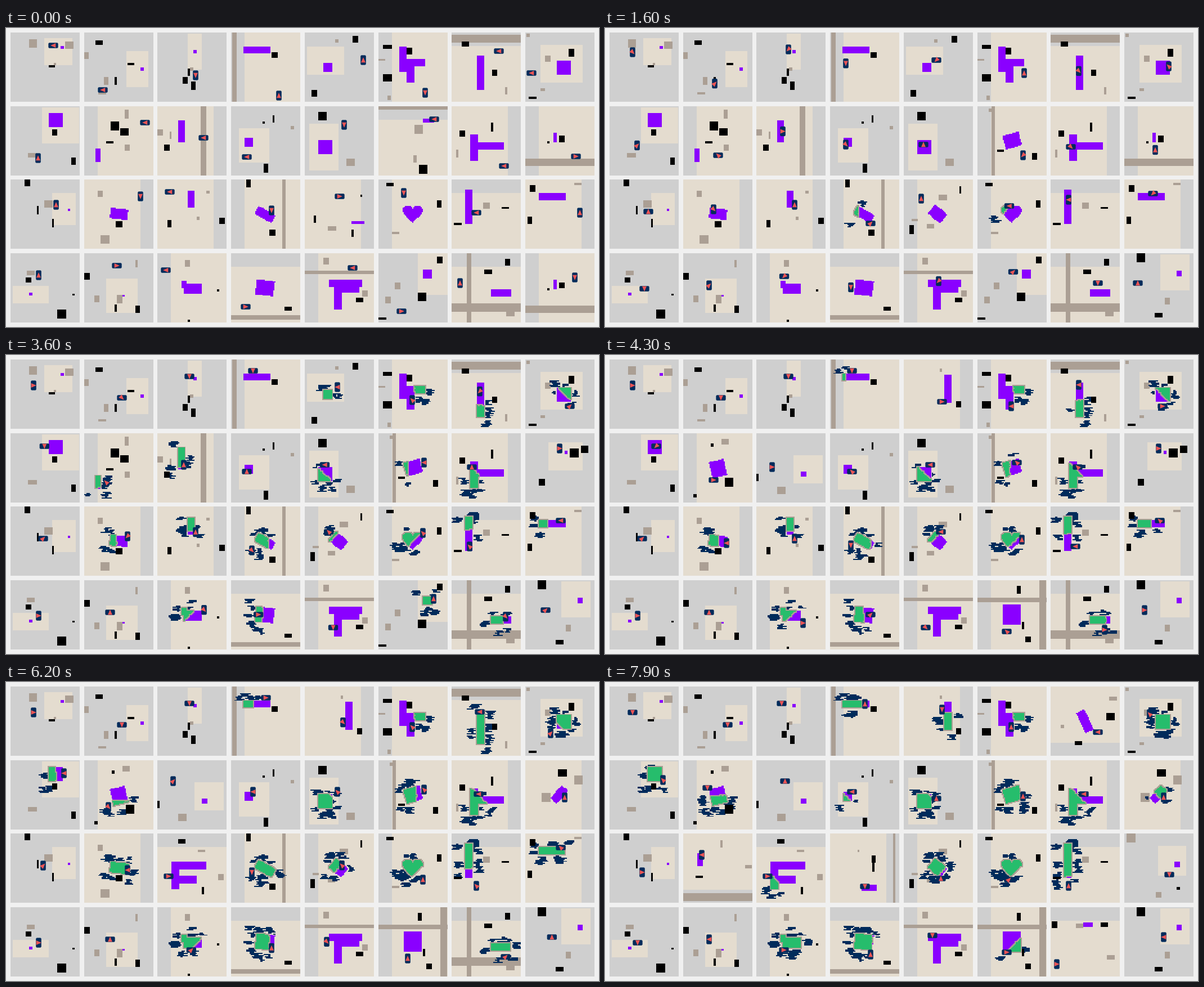
These frames come from a looping animation (1054 by 531 pixels, 8000 ms). A matplotlib script:

```python
import numpy as np
import matplotlib.pyplot as plt
from matplotlib.animation import FuncAnimation
from matplotlib.colors import to_rgb
from matplotlib.patches import FancyBboxPatch, Polygon
from matplotlib.path import Path

W, H, DPI = 1054, 531, 100
FRAMES, STEP_MS = 80, 100
CELLS, SIDE, PITCH, GAP = 64, 123, 130.78, 7.78
HOP, MARGIN = 11.5, 23
NEVER = 999
KEYS = (0, 9, 22, 50, 79)
BG, SAND, SOIL, GOAL, ROCK, NAVY, DUG = range(7)
PALETTE = np.array([to_rgb(c) for c in (
    "#cfcfcf", "#e4dccf", "#ab9f94", "#8a00ff", "#000000", "#002b5b", "#26bd6c")])
COMPASS = {name: i * 45 for i, name in enumerate("E SE S SW W NW N NE".split())}
SIZES = dict(dot=(4, 4), bit=(6, 6), post=(4, 14), tall=(8, 14), lump=(10, 11),
             block=(15, 14), flat=(13, 4), slab=(14, 8))

episodes = {}


def box(x0, y0, x1, y1):
    return np.array([(x0, y0), (x1, y0), (x1, y1), (x0, y1)])


def tilted(cx, cy, w, h, deg):
    a = np.radians(deg)
    turn = np.array([(np.cos(a), np.sin(a)), (-np.sin(a), np.cos(a))])
    return box(-w / 2, -h / 2, w / 2, h / 2) @ turn + (cx, cy)


def heart(cx, cy, size):
    t = np.linspace(0, 2 * np.pi, 60)
    y = 13 * np.cos(t) - 5 * np.cos(2 * t) - 2 * np.cos(3 * t) - np.cos(4 * t)
    return np.column_stack([16 * np.sin(t) ** 3, -y]) * size / 16 + (cx, cy)


def origin(col, row):
    return GAP + PITCH * col, GAP + PITCH * row


def field(side, ox, oy):
    """Whole tile except a margin on one side."""
    x0, y0, x1, y1 = ox, oy, ox + SIDE, oy + SIDE
    return box(x0 + MARGIN * (side == "L"), y0 + MARGIN * (side == "T"),
               x1 - MARGIN * (side == "R"), y1 - MARGIN * (side == "B"))


def road(axis, mid, width, ox, oy):
    a, b = mid - width / 2, mid + width / 2
    return box(a, oy, b, oy + SIDE) if axis == "v" else box(ox, a, ox + SIDE, b)


def item(x, y, kind):
    w, h = SIZES[kind]
    return box(x - w / 2, y - h / 2, x + w / 2, y + h / 2)


def mask(shape, X, Y):
    grid = np.column_stack([X.ravel(), Y.ravel()])
    return Path(shape).contains_points(grid).reshape(X.shape)


def grow(m, n=1):
    p = np.pad(m, n)
    span = range(2 * n + 1)
    return np.any([p[i:i + CELLS, j:j + CELLS] for i in span for j in span], axis=0)


def spill(bite, free, rng):
    """Two ragged heaps a short way off the cells just dug."""
    out = np.zeros_like(bite)
    spots = np.argwhere(grow(bite, 7) & ~grow(bite, 3) & free)
    if len(spots):
        for r, c in spots[rng.integers(len(spots), size=2)]:
            for i in range(rng.integers(3, 7)):
                left, right = rng.integers(1, 6, 2)
                out[r + i:r + i + 1, max(0, c - left):c + right] = True
    return out & free


def excavate(base, X, Y, dig, rng):
    """Frame in which each cell is dug or covered by spoil."""
    dug, dirt = np.full(X.shape, NEVER), np.full(X.shape, NEVER)
    if dig:
        sweep, first, last, share = dig
        a = np.radians(COMPASS[sweep])
        goal = base == GOAL
        free = ~grow(goal) & (base != ROCK)
        order = np.argsort((X * np.cos(a) + Y * np.sin(a))[goal])
        cells = np.argwhere(goal)[order][:int(share * goal.sum())]
        n = max(1, (last - first) // 7)
        for i, part in enumerate(np.array_split(cells, n)):
            when = first + round((i + 1) * (last - first) / n)
            bite = np.zeros(X.shape, bool)
            bite[tuple(part.T)] = True
            dug[bite] = when
            heap = spill(bite, free, rng)
            dirt[heap] = np.minimum(dirt[heap], when)
    return dug, dirt


def tile(col, row, sand, goal, rocks, soils, poses, dig=None, start=0, roads=()):
    ox, oy = origin(col, row)
    mid = (np.arange(CELLS) + 0.5) * SIDE / CELLS
    X, Y = np.meshgrid(mid + ox, mid + oy)
    ground = field(sand, ox, oy) if isinstance(sand, str) else box(*sand)
    layers = [(SAND, ground)]
    layers += [(SOIL, road(*r, ox, oy)) for r in roads]
    layers += [(SOIL, item(*s)) for s in soils]
    layers += [(GOAL, g) for g in goal] + [(ROCK, item(*r)) for r in rocks]
    base = np.full(X.shape, BG)
    for kind, shape in layers:
        base[mask(shape, X, Y)] = kind
    dug, dirt = excavate(base, X, Y, dig, np.random.default_rng(97 * col + 13 * row + start))
    keys = [k for k in KEYS if k >= start][:len(poses)]
    episodes.setdefault((col, row), []).append(
        dict(start=start, base=base, dug=dug, dirt=dirt, keys=keys, poses=poses))


def route(a, b):
    """Poses from a to b in single hops, along the current heading first."""
    (x, y, da), (bx, by, db) = a, b
    turn = (COMPASS[db[1:]] - COMPASS[da[1:]] + 180) % 360 - 180
    out = [(x, y, da[0])]
    for axis in ("hv" if da[0] == "h" else "vh"):
        gap = bx - x if axis == "h" else by - y
        n = int(round(abs(gap) / HOP))
        if n and out[-1][2] != axis:
            out.append((x, y, axis))
        for i in range(1, n + 1):
            d = gap * i / n
            out.append((x + d, y, axis) if axis == "h" else (x, y + d, axis))
        x, y = out[-1][:2]
    if out[-1] != (bx, by, db[0]) or turn:
        out.append((bx, by, db[0]))
    last = max(1, len(out) - 1)
    return [(px, py, ax, COMPASS[da[1:]] + round(turn * i / last / 45) * 45)
            for i, (px, py, ax) in enumerate(out)]


def pose_at(ep, f):
    keys, poses = ep["keys"], ep["poses"]
    for i in range(len(keys) - 1):
        if keys[i] <= f < keys[i + 1]:
            path = route(poses[i], poses[i + 1])
            return path[int((f - keys[i]) / (keys[i + 1] - keys[i]) * len(path))]
    x, y, d = poses[0] if f < keys[0] else poses[-1]
    return x, y, d[0], COMPASS[d[1:]]


# Top row
tile(0, 0, (67, 17, 117, 66), [box(96, 31, 102, 36)], [(81, 67, "flat")],
     [(47, 27, "block"), (112, 30, "block"), (86, 64, "dot")],
     [(84, 31, "hW"), (60, 43, "hS"), (49, 54, "vE"), (49, 54, "vE"), (49, 54, "hS")])
tile(1, 0, (213, 40, 252, 104), [box(238, 69, 244, 75)],
     [(164, 25, "slab"), (221, 64, "flat"), (194, 93, "post")],
     [(177, 93, "tall"), (141, 48, "lump"), (170, 115, "flat")],
     [(172, 110, "hW"), (184, 110, "hN"), (195, 76, "vE"), (206, 76, "hS"), (218, 76, "hS")])
tile(2, 0, (323, 10, 348, 73), [box(333, 38, 338, 44)],
     [(325, 78, "post"), (318, 93, "lump"), (333, 102, "tall")], [(330, 73, "bit")],
     [(337, 84, "vS"), (326, 49, "hN"), (326, 38, "hS"), (326, 38, "hS"), (314, 38, "hS")])
tile(3, 0, "L", [box(421, 33, 469, 44)], [(477, 47, "lump")], [],
     [(485, 120, "vN"), (451, 86, "hS"), (428, 28, "hS"), (439, 28, "hS"), (462, 39, "vN")],
     ("E", 34, 79, .72), roads=[("v", 406, 8)])
tile(4, 0, (535, 33, 600, 82), [box(564, 62, 579, 77)],
     [(620, 19, "lump"), (547, 116, "lump")], [(587, 23, "bit")],
     [(635, 57, "vN"), (566, 57, "hS"), (589, 57, "vW")], ("E", 14, 34, 1))
tile(4, 0, "R", [box(602, 35, 615, 84)], [(628, 87, "lump")], [(596, 26, "dot")],
     [(599, 83, "hE"), (599, 49, "vS")], ("N", 56, 79, .62), start=43)
tile(5, 0, "L", [box(698, 33, 712, 77), box(712, 54, 744, 67), box(712, 67, 725, 96)],
     [(677, 32, "slab"), (677, 88, "block"), (716, 40, "lump")],
     [(667, 56, "flat"), (680, 123, "bit")],
     [(745, 115, "vS"), (745, 57, "vNW"), (745, 80, "hN"), (722, 91, "vW"), (722, 80, "vN")],
     ("W", 14, 30, .175))
tile(6, 0, "T", [box(837, 48, 850, 109)], [(817, 28, "slab"), (869, 79, "lump")],
     [(888, 111, "post")],
     [(876, 41, "hW"), (842, 53, "vE"), (842, 88, "vS"), (842, 53, "hW"), (852, 53, "hW")],
     ("N", 15, 62, .97), roads=[("h", 18, 14)])
tile(6, 0, "B", [tilted(853, 69, 16, 40, -25)], [(898, 60, "block"), (841, 107, "slab")],
     [(903, 29, "slab"), (812, 78, "bit")], [(876, 89, "hW")], start=70)
tile(7, 0, (950, 29, 1025, 96), [box(979, 58, 1004, 83)],
     [(1005, 44, "tall"), (936, 123, "flat")],
     [(928, 12, "bit"), (962, 54, "lump"), (954, 109, "bit")],
     [(934, 80, "hW"), (1002, 80, "vW"), (1002, 68, "vN"), (991, 91, "hE"), (968, 57, "vNW")],
     ("SW", 10, 66, 1))

# Second row
tile(0, 1, (63, 140, 128, 204), [box(75, 150, 100, 175)],
     [(86, 184, "lump"), (120, 235, "tall")], [(46, 225, "slab")],
     [(57, 231, "vN"), (57, 231, "hN"), (57, 186, "vE"), (91, 162, "hSW"), (103, 174, "vNW")],
     ("E", 40, 74, 1))
tile(1, 1, "L", [box(158, 213, 167, 237)],
     [(192, 173, "block"), (209, 184, "block"), (183, 202, "flat")],
     [(214, 152, "tall"), (215, 211, "lump")],
     [(247, 168, "hW"), (247, 226, "hN"), (178, 226, "vNW")], ("S", 15, 36, .87))
tile(1, 1, "L", [tilted(200, 201, 27, 30, -15)],
     [(190, 158, "bit"), (219, 225, "block"), (158, 249, "bit")], [(213, 153, "slab")],
     [(193, 222, "hE"), (182, 188, "hS")], ("N", 43, 79, .48), start=43)
tile(2, 1, "R", [box(306, 164, 317, 202)], [(285, 211, "lump")],
     [(274, 184, "lump"), (292, 190, "post")],
     [(351, 195, "hW"), (316, 172, "hS"), (316, 195, "vN")],
     ("S", 13, 36, .88), roads=[("v", 351, 10)])
tile(2, 1, (334, 177, 386, 227), [box(348, 206, 357, 215)], [(271, 217, "post")],
     [(313, 239, "block")], [(297, 199, "vE"), (320, 176, "hN")], start=43)
tile(3, 1, (413, 177, 467, 238), [box(423, 194, 438, 209)],
     [(475, 160, "post"), (458, 167, "dot"), (462, 248, "tall")], [(508, 176, "bit")],
     [(428, 229, "hW"), (439, 207, "hS"), (428, 195, "vE"), (439, 207, "vW"), (439, 195, "hW")],
     ("NE", 72, 79, .3))
tile(4, 1, (538, 169, 590, 252), [box(554, 198, 579, 223)], [(562, 156, "block")],
     [(611, 237, "block")],
     [(601, 172, "vS"), (566, 195, "vE"), (555, 207, "vNW"), (578, 195, "hW"), (589, 207, "hN")],
     ("NE", 10, 62, .97))
tile(5, 1, "T", [box(740, 160, 760, 167)], [(740, 250, "block")],
     [(733, 179, "block"), (726, 232, "post")],
     [(761, 162, "hW"), (750, 162, "hE")], ("W", 4, 9, .3), roads=[("h", 141, 6)])
tile(5, 1, "L", [tilted(723, 199, 30, 25, -18)], [(702, 217, "flat"), (763, 227, "lump")],
     [(683, 145, "bit")],
     [(743, 226, "vSW"), (732, 191, "hNW"), (743, 203, "vN")],
     ("E", 28, 74, .97), start=15, roads=[("v", 689, 5)])
tile(6, 1, "R", [box(825, 189, 838, 235), box(838, 202, 885, 215)],
     [(811, 186, "lump"), (864, 175, "post")], [(802, 222, "post")],
     [(885, 245, "hW"), (862, 211, "hS"), (828, 222, "vE"), (840, 199, "hW"), (851, 199, "hW")],
     ("NE", 14, 50, .55))
tile(7, 1, "L", [box(973, 185, 979, 202)], [(964, 202, "dot"), (988, 196, "lump")], [],
     [(1013, 228, "hE"), (978, 228, "hN"), (978, 205, "vN")],
     ("S", 14, 22, .75), roads=[("h", 237.5, 13)])
tile(7, 1, (964, 154, 1025, 204), [box(993, 169, 998, 175)],
     [(1009, 173, "block"), (1028, 166, "block"), (952, 225, "lump")], [],
     [(984, 166, "vE")], ("S", 43, 50, 1), start=29)
tile(7, 1, "R", [tilted(983, 199, 31, 15, -48)], [(988, 161, "block")],
     [(1017, 173, "block"), (959, 204, "block")], [(993, 205, "vN")],
     ("SW", 64, 79, .55), start=56)

# Third row
tile(0, 2, (81, 292, 123, 350), [box(109, 321, 113, 325)],
     [(37, 275, "lump"), (56, 323, "post"), (83, 346, "post")], [(75, 313, "block")],
     [(89, 314, "vN"), (77, 314, "vW"), (66, 326, "hNE"), (66, 326, "hNE"), (66, 338, "vE")])
tile(1, 2, "R", [tilted(200, 330, 32, 18, 6)], [(200, 348, "lump")],
     [(166, 295, "lump"), (175, 375, "block")],
     [(239, 299, "vS"), (193, 310, "vE"), (193, 322, "hS"), (216, 334, "vW")],
     ("E", 13, 60, 1))
tile(1, 2, "B", [box(164, 303, 173, 327)], [(166, 347, "flat")],
     [(206, 287, "post"), (254, 328, "flat")], [(172, 307, "vW")],
     start=70, roads=[("h", 381.5, 13)])
tile(2, 2, "R", [box(323, 289, 335, 319)], [(291, 347, "tall"), (384, 343, "lump")],
     [(358, 291, "bit"), (341, 338, "bit")],
     [(291, 291, "hW"), (326, 314, "hN"), (337, 303, "vN"), (337, 326, "vN")],
     ("S", 13, 44, 1))
tile(2, 2, "T", [box(294, 319, 308, 367), box(308, 319, 356, 333), box(308, 344, 338, 358)],
     [(313, 282, "slab"), (350, 370, "post")], [(347, 300, "flat"), (382, 346, "lump")],
     [(289, 345, "hE")], ("NE", 55, 79, .14), start=56)
tile(3, 2, "L", [tilted(460, 331, 35, 16, 29)], [(431, 276, "tall"), (473, 364, "lump")], [],
     [(472, 324, "vS"), (472, 336, "vN"), (460, 347, "hE"), (437, 338, "vS")],
     ("E", 2, 50, 1), roads=[("v", 493, 6)])
tile(3, 2, "R", [box(456, 360, 483, 371)], [(477, 314, "tall"), (477, 329, "post")],
     [(450, 300, "dot")], [(462, 363, "hS")], start=70, roads=[("v", 514, 4)])
tile(4, 2, "R", [box(613, 342, 637, 348)],
     [(548, 340, "post"), (631, 298, "dot"), (615, 364, "post")], [(579, 356, "slab")],
     [(593, 299, "hE"), (605, 345, "hS")])
tile(4, 2, "L", [tilted(590.5, 330, 28, 21, 40)], [(631, 288, "post"), (545, 358, "tall")],
     [(550, 340, "flat"), (600, 301, "slab"), (578, 352, "slab")],
     [(562, 303, "vN"), (597, 314, "hW"), (597, 349, "hN")], ("SE", 28, 79, .82), start=15)
tile(5, 2, "L", [heart(722, 328, 18)], [(682, 278, "flat"), (769, 312, "tall")],
     [(692, 363, "flat")],
     [(707, 293, "vS"), (707, 316, "hW"), (730, 316, "hW"), (741, 328, "vN"), (718, 351, "hNE")],
     ("SE", 3, 52, .93))
tile(6, 2, "T", [box(816, 287, 829, 348)], [(888, 319, "flat"), (803, 349, "flat")],
     [(854, 315, "lump")],
     [(836, 328, "hW"), (824, 293, "vW"), (824, 305, "vNW"), (836, 340, "vW"), (824, 362, "vN")],
     ("S", 13, 74, .95))
tile(7, 2, "R", [box(946, 292, 994, 306)], [(936, 285, "lump"), (931, 341, "tall")],
     [(1017, 277, "flat")],
     [(1020, 328, "vN"), (974, 316, "vW"), (962, 294, "hSW"), (986, 294, "hNW")],
     ("E", 14, 60, .95))
tile(7, 2, (983, 291, 1033, 344), [box(1012, 319, 1022, 329)], [(1019, 367, "bit")],
     [(934, 277, "block"), (984, 378, "lump")], [(1003, 342, "hS")], start=70)

# Bottom row
tile(0, 3, (12, 457, 75, 489), [box(40, 469, 46, 475)],
     [(39, 447, "lump"), (98, 508, "block"), (119, 473, "dot")], [(43, 435, "slab")],
     [(58, 439, "vN"), (70, 439, "vW"), (58, 463, "vE"), (58, 463, "vE"), (58, 463, "hS")])
tile(1, 3, (177, 444, 233, 506), [box(206, 473, 210, 477)],
     [(144, 440, "lump"), (194, 497, "post"), (233, 499, "tall")],
     [(230, 419, "post"), (160, 481, "lump"), (201, 481, "tall")],
     [(197, 422, "hE"), (185, 445, "hS"), (185, 457, "hN"), (185, 457, "hN"), (185, 457, "vW")])
tile(2, 3, "L", [box(311, 448, 322, 462), box(315, 454, 348, 471)],
     [(377, 465, "dot"), (325, 519, "dot")], [(322, 417, "lump")],
     [(284, 430, "hW"), (307, 441, "hSW"), (330, 441, "hSW"), (352, 476, "hNE"),
      (318, 476, "hE")], ("SE", 12, 72, 1))
tile(3, 3, "T", [tilted(460, 461, 33, 27, 8)], [(501, 498, "slab")], [],
     [(426, 495, "hE"), (437, 472, "vS"), (437, 449, "vS"), (472, 461, "vN"), (472, 484, "vN")],
     ("E", 10, 72, .92), roads=[("h", 513.5, 7)])
tile(4, 3, "L", [box(573, 446, 633, 459), box(583, 459, 627, 469), box(583, 469, 596, 500)],
     [(628, 483, "slab")], [(568, 414, "lump"), (637, 471, "lump")],
     [(616, 426, "hW"), (570, 438, "hS"), (593, 484, "vW"), (570, 484, "vE"), (582, 450, "hS")],
     roads=[("h", 434, 6)])
tile(5, 3, (731, 400, 785, 473), [box(740, 429, 756, 444)],
     [(771, 411, "lump"), (738, 477, "block"), (669, 516, "flat")],
     [(696, 458, "lump"), (678, 483, "lump")],
     [(703, 503, "hE"), (714, 468, "vE"), (760, 433, "vN")], ("S", 13, 34, .88))
tile(5, 3, "L", [box(705, 442, 738, 479)],
     [(734, 417, "tall"), (742, 480, "post"), (751, 505, "lump")], [],
     [(714, 491, "hNW"), (714, 480, "hE")], ("NW", 66, 79, .25), start=43,
     roads=[("v", 777, 12), ("h", 434.5, 7)])
tile(6, 3, "T", [box(862, 463, 898, 477)], [(892, 416, "lump"), (857, 433, "slab")],
     [(896, 508, "slab")],
     [(807, 453, "vN"), (865, 453, "hS"), (876, 453, "hSW"), (888, 488, "hNE")],
     ("E", 9, 48, .95), roads=[("v", 823, 8), ("h", 496.5, 15)])
tile(6, 3, "T", [box(850, 427, 867, 434)], [(799, 431, "lump"), (887, 431, "slab")],
     [(843, 432, "slab"), (899, 489, "slab")], [(803, 501, "vE")], start=70)
tile(7, 3, "L", [box(973, 446, 979, 463)], [(964, 464, "dot"), (988, 457, "lump")], [],
     [(1011, 443, "vS"), (976, 443, "hW")], roads=[("h", 499, 13)])
tile(7, 3, (987, 402, 1039, 465), [box(1016, 431, 1025, 440)],
     [(952, 408, "block"), (984, 510, "slab")], [(999, 485, "lump")],
     [(947, 453, "hN"), (959, 453, "vE"), (993, 453, "vW")], start=15)


def cells_at(ep, f):
    grid = ep["base"].copy()
    grid[ep["dirt"] <= f] = NAVY
    dug = ep["dug"] <= f
    grid[grow(dug) & (grid != ROCK)] = SOIL
    grid[dug] = DUG
    return grid


fig = plt.figure(figsize=(W / DPI, H / DPI), dpi=DPI)
ax = fig.add_axes([0, 0, 1, 1])
ax.axis("off")
stage = np.empty((H, W, 3))
stage[:] = to_rgb("#f0f0f0")
picture = ax.imshow(stage, extent=(0, W, H, 0), interpolation="nearest", aspect="auto")
ax.set_xlim(0, W)
ax.set_ylim(H, 0)

ZOOM = np.arange(SIDE) * CELLS // SIDE
ARROW = np.array([(5, 0), (-4.3, -4), (-4.3, 4)])
bodies, cabins = {}, {}
for spot in episodes:
    bodies[spot] = ax.add_patch(FancyBboxPatch(
        (0, 0), 17, 9, boxstyle="round,pad=0,rounding_size=2.2", fc="#002b5b", lw=0))
    cabins[spot] = ax.add_patch(Polygon(ARROW, fc="#ea5455", lw=0))


def draw(f):
    for spot, runs in episodes.items():
        ep = [e for e in runs if e["start"] <= f][-1]
        ox, oy = (int(round(v)) for v in origin(*spot))
        stage[oy:oy + SIDE, ox:ox + SIDE] = PALETTE[cells_at(ep, f)[np.ix_(ZOOM, ZOOM)]]
        x, y, axis, heading = pose_at(ep, f)
        w, h = (17.3, 9.6) if axis == "h" else (9.6, 17.3)
        bodies[spot].set_bounds(x - w / 2, y - h / 2, w, h)
        c, s = np.cos(np.radians(heading)), np.sin(np.radians(heading))
        cabins[spot].set_xy(ARROW @ np.array([(c, s), (-s, c)]) + (x, y))
    picture.set_data(stage)
    return [picture, *bodies.values(), *cabins.values()]


anim = FuncAnimation(fig, draw, frames=FRAMES, interval=STEP_MS, repeat=True,
                     repeat_delay=0, blit=False)
plt.show()
```
